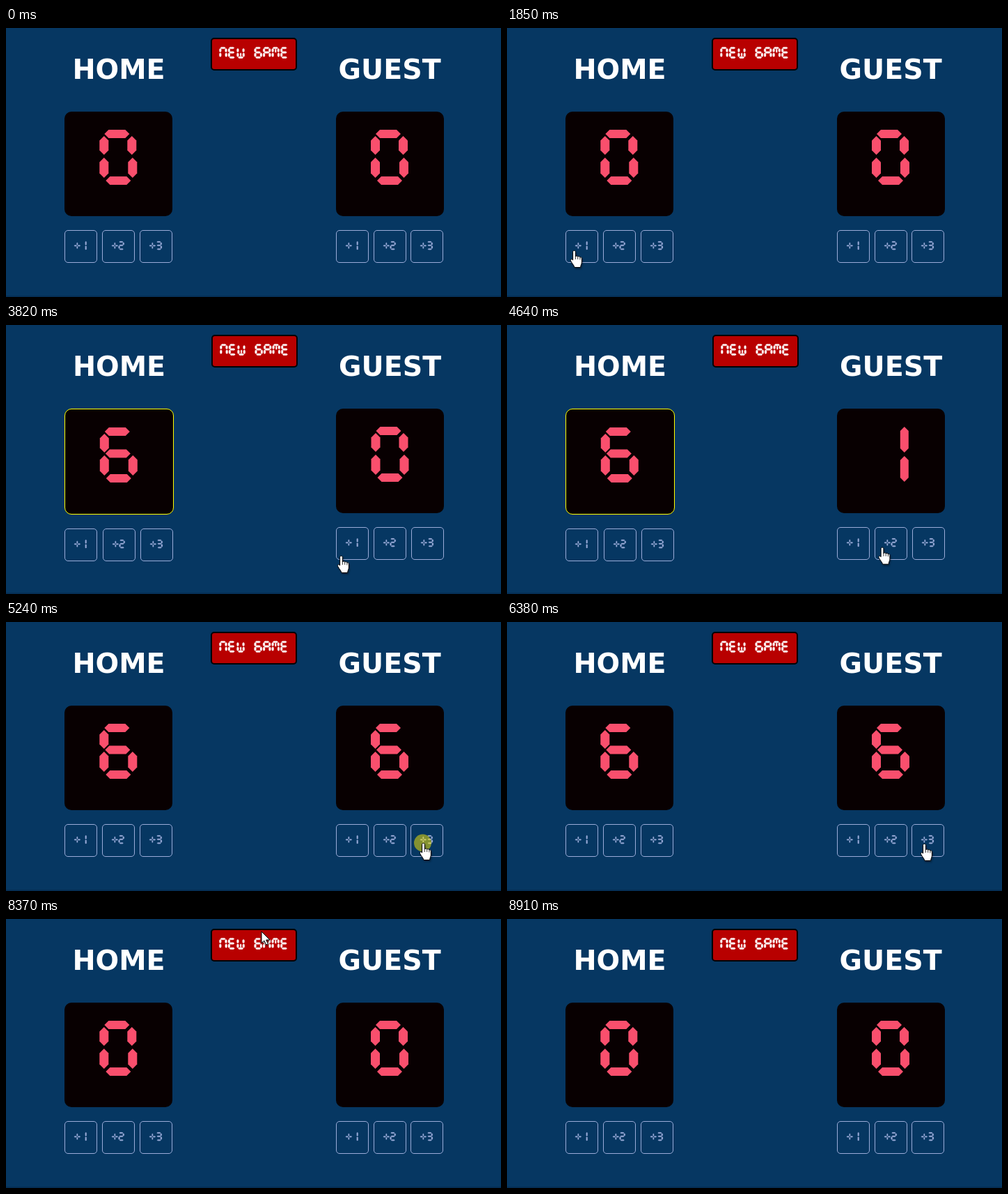
Recreate the animation shown at these times as an HTML page. Size 711x386 px, loop 9.77 s.

```html
<!DOCTYPE html>
<html lang="en">
<head>
<meta charset="utf-8">
<title>Scoreboard</title>
<style>
  html, body { margin: 0; width: 100%; height: 100%; overflow: hidden; background: #063762; }
  svg { display: block; width: 711px; height: 386px; }
  .team { font: bold 39.6px Verdana, "DejaVu Sans", sans-serif; fill: #fff; text-anchor: middle; }
  .panel { fill: #080001; }
  .lead { stroke: #ff0; }
  .score { fill: #f94f6d; }
  .plus { fill: none; stroke: #9aabd8; }
  .label { fill: #9aabd8; stroke: #9aabd8; stroke-width: 1.5; }
  .new { fill: #b80000; stroke: #000; stroke-width: 2; }
  .caption { fill: #fff; stroke: #fff; stroke-width: 2; }
  .pointer { fill: #fff; stroke: #000; stroke-linejoin: round; filter: drop-shadow(1px 2px 1px rgba(0, 0, 0, .35)); }
</style>
</head>
<body>
<svg viewBox="0 0 711 386">
  <rect width="711" height="386" fill="#063762"/>
  <rect y="384" width="711" height="2" fill="#052f55"/>
  <g id="board"></g>
  <circle id="click" r="12.5" fill="#ffeb00" fill-opacity=".5"/>
  <g id="cursor" class="pointer">
    <path id="arrow" d="M0 0V16.5L3.9 13 6.6 19 9.3 17.8 6.7 12H12Z"/>
    <g id="hand">
      <path d="M-2.4 1.2C-2.4-1.2 1.4-1.2 1.4 1.2V8C2 6.6 4.5 6.8 4.7 8.4 5.5 7.2 7.7 7.6 7.9 9.2 8.9 8.4 10.4 9 10.4 10.8V16C10.4 18.5 8.8 20 8.6 23.5H0C-.4 20.8-3 18.8-5.2 14.6-6.5 12-4.4 10.8-2.4 13Z"/>
      <path d="M1.4 8V12M4.7 8.4V12M7.9 9.2V12.5" stroke-width=".8"/>
    </g>
  </g>
</svg>
<script>
const LOOP = 9770, TICK = 65;
const $ = id => document.getElementById(id);

// Segment display: pointed bars in a 54 x 79 cell
function hex(x, y, w, h) {
  const r = Math.min(w, h) / 2, right = x + w, low = y + h;
  return w > h
    ? [x, y + r, x + r, y, right - r, y, right, y + r, right - r, low, x + r, low]
    : [x + r, y, right, y + r, right, low - r, x + r, low, x, low - r, x, y + r];
}
const SEGMENTS = {};
[...'agd'].forEach((s, i) => SEGMENTS[s] = hex(7 + i, [0, 31.5, 67][i], 36, 12));
[...'fb'].forEach((s, i) => SEGMENTS[s] = hex(40 * i, 9, 13, 27));
[...'ec'].forEach((s, i) => SEGMENTS[s] = hex(41 * i, 40, 13, 29));
[...'tu'].forEach((s, i) => SEGMENTS[s] = hex(40.3, 42 * i, 12, 37));
[...'mw'].forEach((s, i) => SEGMENTS[s] = hex(23, 13 + 28 * i, 8, 25));

const GLYPHS = {
  0: 'abcdef', 1: 'tu', 2: 'abged', 3: 'abgcd', 6: 'afgedc', 9: 'abfgcd',
  N: 'abcef', E: 'afged', W: 'bcdefw', G: 'afgedc', A: 'abcefg', M: 'abcefm', ' ': ''
};
const polygon = points => `<polygon points="${points}"/>`;
const plusSign = [0, 90, 180, 270].map(a =>
  `<g transform="translate(28 41) rotate(${a})">${polygon(hex(4, -5, 25, 10))}</g>`).join('');

function lcd(text, x, y, scale, cls) {
  const cells = [...String(text)].map((ch, i) => {
    const body = ch === '+' ? plusSign : [...GLYPHS[ch]].map(s => polygon(SEGMENTS[s])).join('');
    return `<g transform="translate(${i * 61.5})">${body}</g>`;
  });
  return `<g class="${cls}" role="img" aria-label="${text}" transform="translate(${x} ${y}) scale(${scale})">${cells.join('')}</g>`;
}

function box(x, y, w, h, r, cls, line = 0) {
  const i = line / 2;
  return `<rect class="${cls}" x="${x + i}" y="${y + i}" width="${w - line}" height="${h - line}" rx="${r - i}"/>`;
}

function team(name, score, leads, at) {
  const grow = leads ? 2 : 0;
  const buttons = [0, 1, 2].map(i => {
    const x = Math.round(at.button(i));
    return box(x, 290 + grow, 47, 47, 5, 'plus', 1) + lcd('+' + (i + 1), x + 14, 306 + grow, .155, 'label');
  });
  return `<text class="team" x="${at.title}" y="73">${name}</text>` +
    box(at.panel, 120, 155 + grow, 150 + grow, 10, leads ? 'panel lead' : 'panel', leads ? 1 : 0) +
    lcd(score, at.digit, 146 + grow / 2, 1, 'score') + buttons.join('');
}

// The leader's panel gains a border, which nudges the whole row
function drawBoard(home, guest) {
  const lead = Math.sign(home - guest), nudge = lead / 2;
  $('board').innerHTML =
    team('HOME', home, lead > 0, {
      title: 162 + nudge, panel: 84, digit: 134.3 + nudge, button: i => 84 + (54 + nudge) * i
    }) +
    team('GUEST', guest, lead < 0, {
      title: 551.2 + nudge, panel: lead < 0 ? 472 : 474, digit: 524 + nudge, button: i => 473.9 + 53.7 * i + nudge
    }) +
    box(294 + lead, 14, 124, 47, 5, 'new', 2) + lcd('NEW GAME', 306.5 + lead, 27.4, .204, 'caption');
}

// Pointer travel: leave, arrive, x, y
const START = [110, 335];
const MOVES = [
  [1380, 1835, 97, 320], [1900, 2085, 105, 318], [2215, 2600, 156, 317], [2800, 3190, 205, 317],
  [3480, 3805, 482, 332], [3805, 4010, 501, 319], [4485, 4680, 553, 320], [4810, 5070, 600, 318],
  [5310, 5440, 600, 332], [5900, 6095, 557, 326], [6095, 6355, 600, 319],
  [7180, 7440, 367, 18], [8370, 8910, 634, 386]
];
// Presses: time, side, points; a press without a side starts a new game
const CLICKS = [
  [2020, 'home', 1], [2610, 'home', 2], [3280, 'home', 3],
  [4290, 'guest', 1], [4680, 'guest', 2], [5110, 'guest', 3], [6520, 'guest', 3], [7510]
];
const ENTER = MOVES[0][0], EXIT = 8910, RESPONSE = 130, GLOW = 195;

const smooth = k => k * k * (3 - 2 * k);

function pointerAt(t) {
  let [x, y] = START;
  for (const [from, to, tx, ty] of MOVES) {
    if (t < from) break;
    const elapsed = Math.floor((t - from) / TICK) * TICK;
    const k = smooth(Math.min(1, elapsed / (to - from)));
    x += (tx - x) * k;
    y += (ty - y) * k;
  }
  return [x, y];
}

function scoreAt(t) {
  const score = { home: 0, guest: 0 };
  for (const [at, side, points] of CLICKS) {
    if (t < at + RESPONSE) break;
    if (side) score[side] += points;
    else score.home = score.guest = 0;
  }
  return score;
}

const overButton = (x, y) => y > 289 && y < 338 &&
  [84, 474].some(left => x >= left && x < left + 155 && (x - left) % 54 <= 47);
const show = (id, on) => $(id).setAttribute('visibility', on ? 'visible' : 'hidden');

let shown = '';
function render(t) {
  const { home, guest } = scoreAt(t), key = home + ':' + guest;
  if (key !== shown) {
    drawBoard(home, guest);
    shown = key;
  }
  const [x, y] = pointerAt(t);
  const visible = t >= ENTER && t < EXIT, hand = overButton(x, y);
  show('hand', visible && hand);
  show('arrow', visible && !hand);
  show('click', CLICKS.some(([at]) => t >= at && t < at + GLOW));
  $('cursor').setAttribute('transform', `translate(${x} ${y})`);
  $('click').setAttribute('cx', x - 1.5);
  $('click').setAttribute('cy', y - 1);
}

const begin = performance.now();
function tick() {
  render((performance.now() - begin) % LOOP);
  requestAnimationFrame(tick);
}
tick();
</script>
</body>
</html>
```
